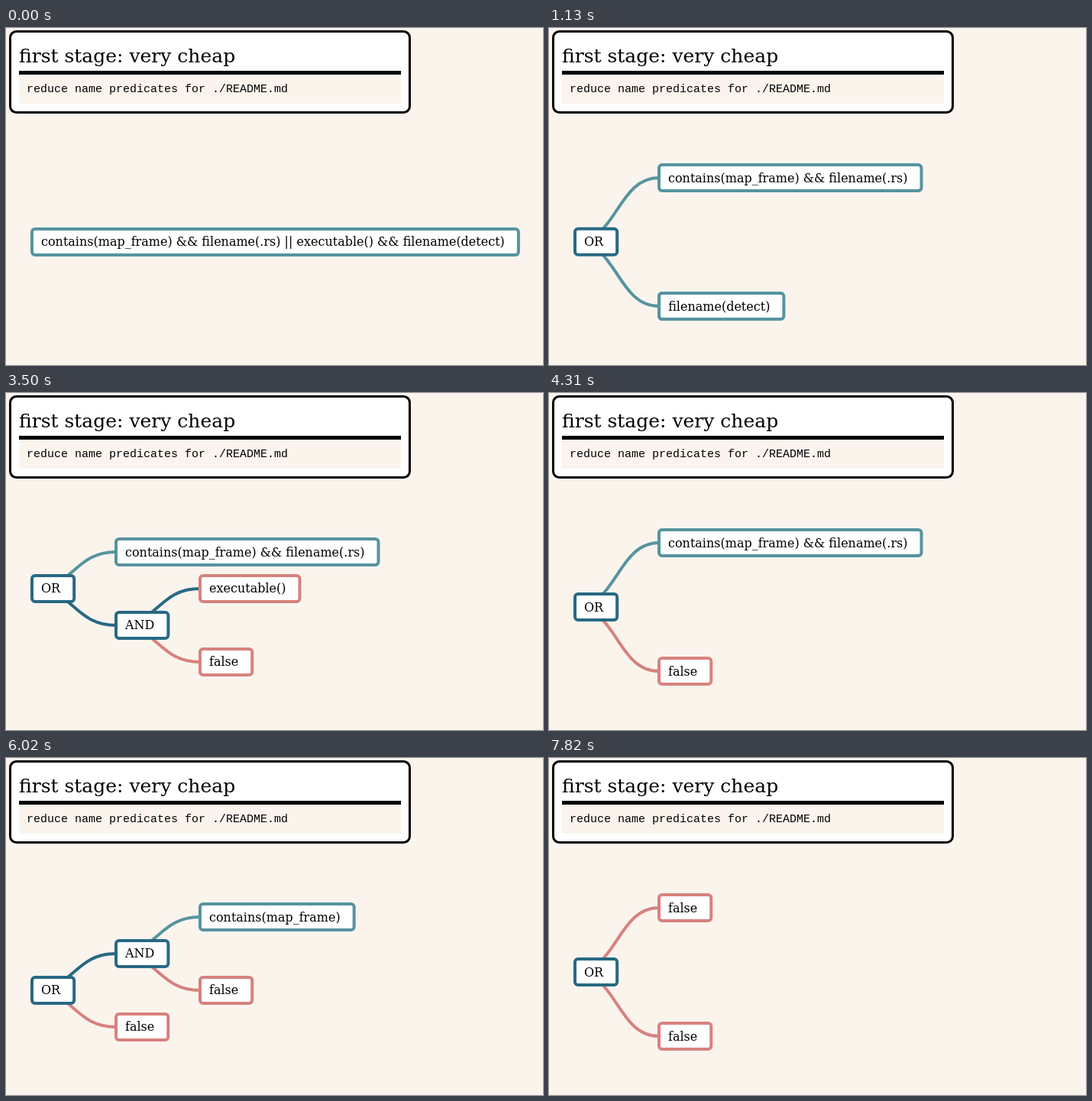
An HTML page that plays this animation: 703 by 441 pixels, repeating every 8000 ms.

```html
<!DOCTYPE html>
<html lang="en">
<head>
<meta charset="utf-8">
<title>Predicate reduction</title>
<style>
  html, body { margin: 0; height: 100%; overflow: hidden; background: #faf4ed; }
  svg { display: block; width: 100%; height: 100%; }
  text { font: 16px "DejaVu Serif", serif; }
  #title { font-size: 25px; }
  #code { font: 15px "Liberation Mono", monospace; }
  #head text { fill: currentColor; }
  #tree rect { fill: #fff; stroke-width: 4; }
  #tree path { fill: none; stroke-width: 4; }
</style>
</head>
<body>
<svg>
  <g id="head">
    <rect x="5.5" y="4.5" width="523" height="106" rx="8" fill="#fff" stroke="currentColor" stroke-width="3"/>
    <text id="title" x="17" y="45">first stage: very cheap</text>
    <rect x="17" y="56" width="500" height="5" fill="currentColor"/>
    <rect x="17" y="61" width="500" height="38" fill="#faf4ed"/>
    <text id="code" x="27" y="84">reduce name predicates for ./README.md</text>
  </g>
  <g id="tree"></g>
</svg>
<script>
const LOOP = 8000, FIRST = 525, STEP = 588, MOVE = 250, FLASH = 590;
const teal = [86, 148, 159], pine = [40, 105, 131], rose = [215, 130, 126];
const flashColor = [199, 21, 133];

const head = document.getElementById('head');
const tree = document.getElementById('tree');
const pen = document.createElement('canvas').getContext('2d');
pen.font = '16px "DejaVu Serif", serif';

// A node's key is its path from the root "r"; y is its centre.
const node = (label, y, color = teal, edge = color) => ({ label, y, color, edge });
const left = 'contains(map_frame) && filename(.rs)';
const right = 'executable() && filename(detect)';

const pair = (a, b, y = 280.1) => ({
  r: node('OR', y, pine),
  r0: node(a, 196.1, a === 'false' ? rose : teal),
  r1: node(b, 364.1, b === 'false' ? rose : teal)
});
const lower = (name, nameColor, ...exec) => ({
  r: node('OR', 255.9, pine),
  r0: node(left, 208.1),
  r1: node('AND', 303.9, pine),
  r10: node('executable()', 255.9, ...exec),
  r11: node(name, 351.9, nameColor)
});
const upper = (name, nameColor, ...contains) => ({
  r: node('OR', 303.9, pine),
  r0: node('AND', 255.9, pine),
  r1: node('false', 351.9, rose),
  r00: node('contains(map_frame)', 208.1, ...contains),
  r01: node(name, 303.9, nameColor)
});

// split, visit the name test, reduce it, try its sibling, give up on it
const visits = (build, name) => [
  build(name, teal),
  build(name, pine),
  build('false', rose),
  build('false', rose, rose, pine),
  build('false', rose)
];
const scenes = [
  { r: node(left + ' || ' + right, 279.9) },
  pair(left, right, 279.9),
  ...visits(lower, 'filename(detect)'),
  pair(left, 'false'),
  ...visits(upper, 'filename(.rs)'),
  pair('false', 'false')
];

const clamp = v => Math.max(0, Math.min(1, v));
const ease = t => t < .5 ? 4 * t ** 3 : 1 - 4 * (1 - t) ** 3;
const mix = (a, b, p) => a + (b - a) * p;
const blend = (a, b, p) => `rgb(${a.map((v, i) => mix(v, b[i], p))})`;
const parent = key => key.slice(0, -1);
const column = key => 34 + 110 * (key.length - 1);

// Place of a node in a scene, or of its nearest ancestor there.
function place(scene, key) {
  while (!scene[key]) key = parent(key);
  return { x: column(key), y: scene[key].y };
}

function drawTree(from, to, p) {
  const at = key => {
    const a = place(from, key), b = place(to, key);
    return { x: mix(a.x, b.x, p), y: mix(a.y, b.y, p) };
  };
  let edges = '', boxes = '';
  for (const key of Object.keys({ ...from, ...to })) {
    const now = to[key] || from[key], old = from[key] || now;
    const fade = to[key] ? 1 : 1 - p;
    if (!fade) continue;
    const { x, y } = at(key);
    if (key !== 'r') {
      const s = at(parent(key)), m = (s.x + x) / 2;
      edges += `<path opacity="${fade}" stroke="${blend(old.edge, now.edge, p)}"
        d="M${s.x},${s.y}C${m},${s.y} ${m},${y} ${x},${y}"/>`;
    }
    const width = pen.measureText(now.label).width + 30;
    boxes += `<g opacity="${fade}">
      <rect x="${x}" y="${y - 17}" width="${width}" height="34" rx="4" stroke="${blend(old.color, now.color, p)}"/>
      <text x="${x + 12}" y="${Math.round(y + 5.5)}">${now.label.replace(/&/g, '&amp;')}</text></g>`;
  }
  tree.innerHTML = edges + boxes;
}

function frame() {
  const t = performance.now() % LOOP;
  const flash = ease(clamp(1 - Math.abs(t - FLASH) / FLASH));
  head.style.color = blend([0, 0, 0], flashColor, flash);

  const k = Math.max(0, Math.floor((t - FIRST) / STEP) + 1);
  const p = ease(clamp((t - FIRST - STEP * (k - 1)) / MOVE));
  drawTree(scenes[Math.max(0, k - 1)], scenes[k], p);
  requestAnimationFrame(frame);
}
frame();
</script>
</body>
</html>
```
